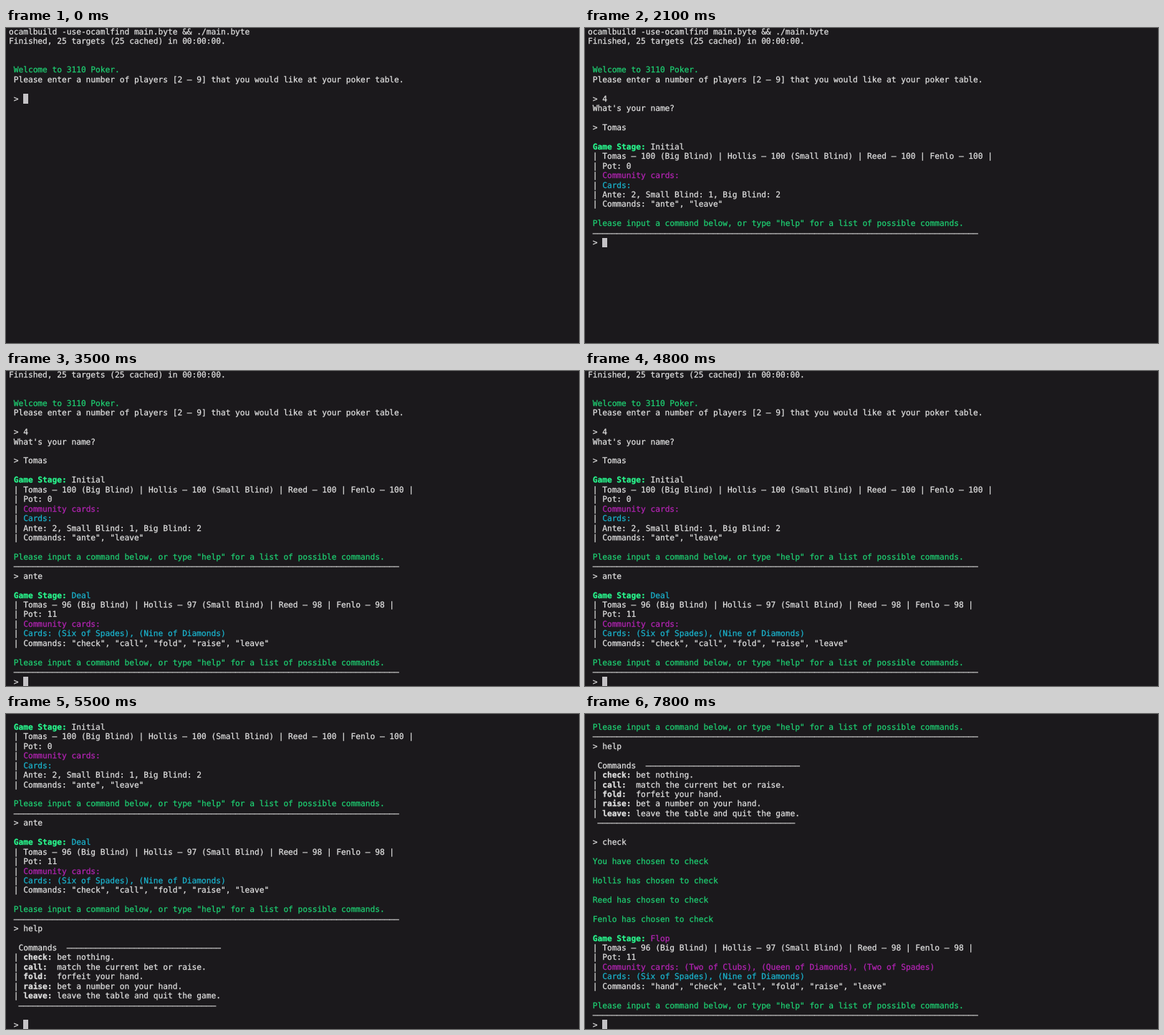
Write an HTML page that moves like this. It is 800 by 441 pixels and loops after 8000 ms.

```html
<!DOCTYPE html>
<html lang="en">
<head>
<meta charset="utf-8">
<title>Terminal poker</title>
<style>
  html, body { margin: 0; width: 100%; height: 100%; overflow: hidden; background: #1b191c; }
  pre {
    position: absolute; left: 4px; top: -1.5px; margin: 0;
    font: 11.18px/13.44px "DejaVu Sans Mono", monospace;
    text-rendering: geometricPrecision;
    -webkit-text-stroke: .25px;
    color: #e0e0e0;
  }
  .green { color: #1ecf72; }
  .magenta { color: #b424b4; }
  .cyan { color: #1ab4ce; }
  b.green { color: #28f58c; }
  .cursor { background: #c4c2c5; padding-top: .5px; }
</style>
</head>
<body>
<pre id="screen"></pre>
<script>
const LOOP = 8000, ROWS = 33;
const screen = document.getElementById('screen');

const paint = (color, text) => `<span class="${color}">${text}</span>`;
const rule = n => '—'.repeat(n);
const PROMPT = '\n > ';

const players = (you, small, others) =>
  `Tomas — ${you} (Big Blind) | Hollis — ${small} (Small Blind) | Reed — ${others} | Fenlo — ${others} |`;

const stage = (name, seats, pot, community, cards, ...extra) => [
  '', '',
  ` <b class="green">Game Stage:</b> ${name}`,
  ...[
    seats,
    `Pot: ${pot}`,
    paint('magenta', `Community cards:${community}`),
    paint('cyan', `Cards:${cards}`),
    ...extra
  ].map(line => ` | ${line}`),
  '',
  paint('green', ' Please input a command below, or type "help" for a list of possible commands.'),
  ' ' + rule(80)
].join('\n') + PROMPT;

const commands = (...names) => 'Commands: ' + names.map(n => `"${n}"`).join(', ');
const help = (name, text) => ` | <b>${name}:</b>${' '.repeat(6 - name.length)}${text}`;
const hand = ' (Six of Spades), (Nine of Diamonds)';
const later = players(96, 97, 98);

// Each event appends text to the log at a given time.
const events = [];
const print = (time, text) => events.push({ time, text });
const type = (time, word, step = 100) =>
  [...word].forEach((char, i) => print(time + i * step, char));

print(0, [
  'ocamlbuild -use-ocamlfind main.byte &amp;&amp; ./main.byte',
  'Finished, 25 targets (25 cached) in 00:00:00.',
  '', '',
  paint('green', ' Welcome to 3110 Poker.'),
  ' Please enter a number of players [2 – 9] that you would like at your poker table.',
  ''
].join('\n') + PROMPT);

type(300, '4');
print(600, "\n What's your name?\n" + PROMPT);

type(1000, 'Tomas');
print(1700, stage('Initial', players(100, 100, 100), 0, '', '',
  'Ante: 2, Small Blind: 1, Big Blind: 2', commands('ante', 'leave')));

type(2700, 'ante');
print(3500, stage(paint('cyan', 'Deal'), later, 11, '', hand,
  commands('check', 'call', 'fold', 'raise', 'leave')));

type(5000, 'help');
print(5500, [
  '', '',
  '  Commands  ' + rule(32),
  help('check', 'bet nothing.'),
  help('call', 'match the current bet or raise.'),
  help('fold', 'forfeit your hand.'),
  help('raise', 'bet a number on your hand.'),
  help('leave', 'leave the table and quit the game.'),
  '  ' + rule(41),
  ''
].join('\n') + PROMPT);

type(6800, 'check', 75);
print(7600,
  ['You have', 'Hollis has', 'Reed has', 'Fenlo has']
    .map(who => '\n\n' + paint('green', ` ${who} chosen to check`)).join('') +
  stage(paint('magenta', 'Flop'), later, 11,
    ' (Two of Clubs), (Queen of Diamonds), (Two of Spades)', hand,
    commands('hand', 'check', 'call', 'fold', 'raise', 'leave')));

let shown = 0;
function frame() {
  const now = performance.now() % LOOP;
  const past = events.filter(e => e.time <= now);
  if (past.length !== shown) {
    shown = past.length;
    const log = past.map(e => e.text).join('') + paint('cursor', ' ');
    screen.innerHTML = log.split('\n').slice(-ROWS).join('\n');
  }
  requestAnimationFrame(frame);
}
frame();
</script>
</body>
</html>
```
